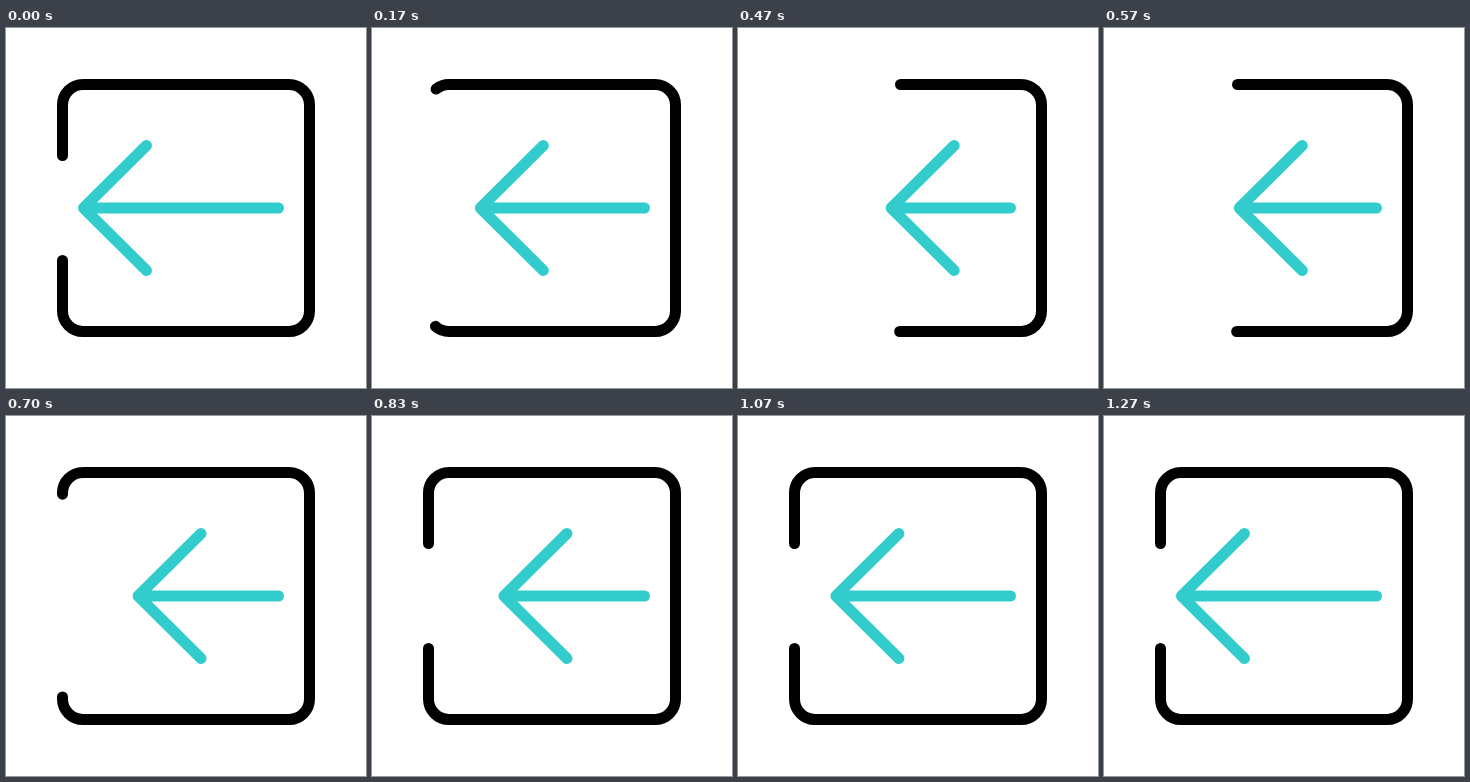
These frames come from a looping animation (360 px wide and 360 px high, 2000 ms). An HTML page:

```html
<!DOCTYPE html>
<html lang="en">
<head>
<meta charset="utf-8">
<title>Arrow and box</title>
<style>
  html, body { margin: 0; width: 100%; height: 100%; overflow: hidden; background: #fff; }
  svg { display: block; width: 100vw; height: 100vh; }
  path { fill: none; stroke-width: 11; stroke-linecap: round; stroke-linejoin: round; }
</style>
</head>
<body>
<svg viewBox="0 0 360 360">
  <path id="box" stroke="#000" d="M56.5 127.5V77A20.5 20.5 0 0 1 77 56.5H283A20.5 20.5 0 0 1 303.5 77V283A20.5 20.5 0 0 1 283 303.5H77A20.5 20.5 0 0 1 56.5 283V232.5"/>
  <path id="arrow" stroke="#33cccc"/>
</svg>
<script>
  const LOOP = 2000, STEP = 1000 / 30;
  const box = document.getElementById('box');
  const arrow = document.getElementById('arrow');
  const boxLength = box.getTotalLength();

  // [step, value] keys, eased between neighbours
  const trimKeys = [[0, 0], [11.4, 168], [14.2, 168], [24.8, 0]];
  const pullKeys = [[0, 0], [12, 82], [18.5, 54], [24, 55.3], [37.6, 0]];

  const ease = x => x * x * (3 - 2 * x);

  function valueAt(keys, k) {
    const i = keys.findIndex(key => key[0] > k);
    if (i < 0) return keys[keys.length - 1][1];
    const [t0, v0] = keys[i - 1], [t1, v1] = keys[i];
    return v0 + (v1 - v0) * ease((k - t0) / (t1 - t0));
  }

  function draw(time) {
    const k = Math.floor((time % LOOP + 3.4) / STEP) % 60;

    const trim = valueAt(trimKeys, k);
    box.setAttribute('stroke-dasharray', `${boxLength - 2 * trim} ${boxLength}`);
    box.setAttribute('stroke-dashoffset', -trim);

    const tip = 77.5 + valueAt(pullKeys, k);
    const barb = tip + 63;
    arrow.setAttribute('d', `M${barb} 117.5L${tip} 180L${barb} 242.5M${tip} 180H272.5`);
  }

  let start;
  function tick(now) {
    start ??= now;
    draw(now - start);
    requestAnimationFrame(tick);
  }
  draw(0);
  requestAnimationFrame(tick);
</script>
</body>
</html>
```
